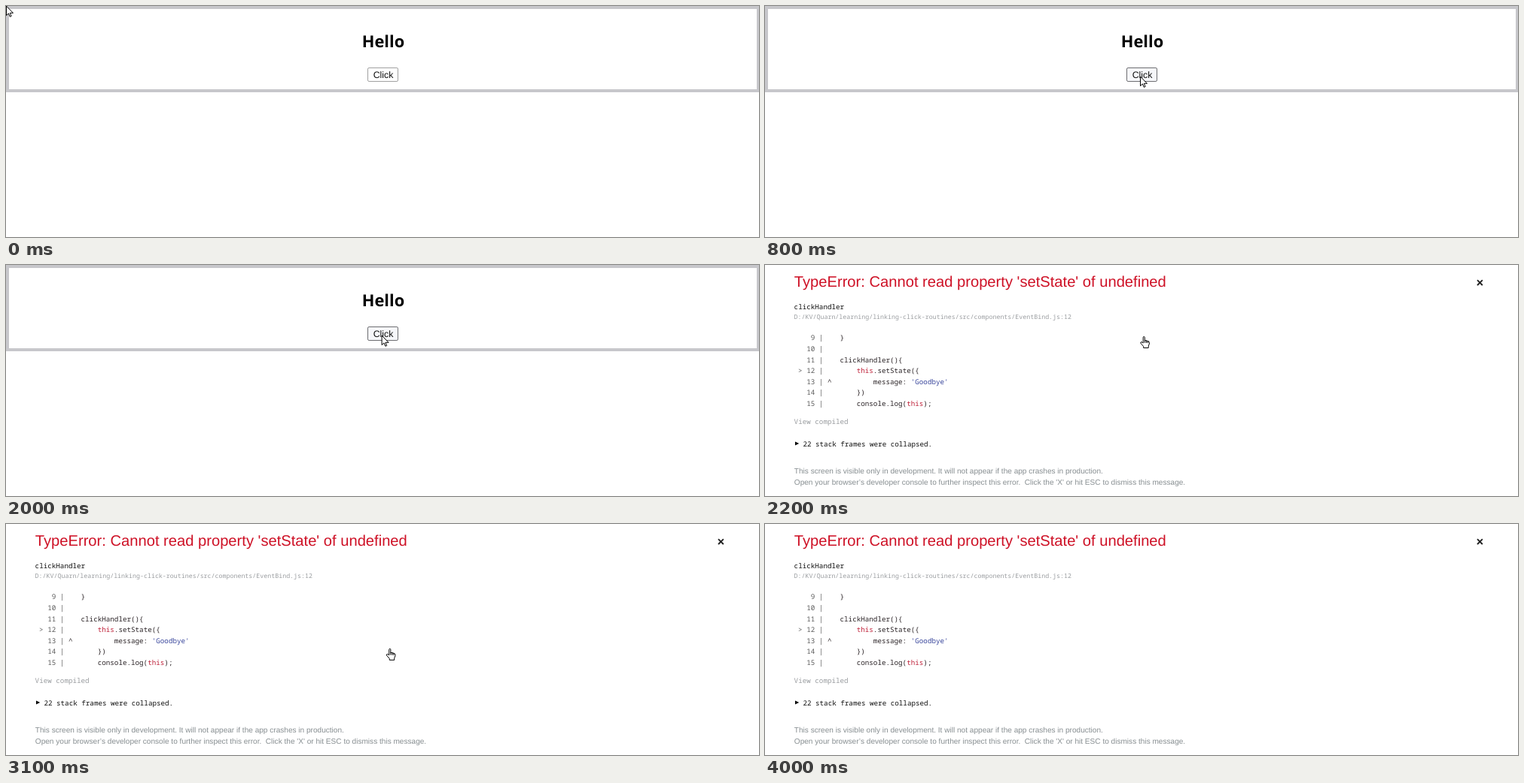
These frames come from a looping animation (1000 by 308 pixels, 6 s). An HTML page:

```html
<!DOCTYPE html>
<html lang="en">
<head>
<meta charset="utf-8">
<title>Click error</title>
<style>
  html, body { margin: 0; width: 100%; height: 100%; overflow: hidden; background: #fff; }
  svg { display: block; width: 100%; height: 100%; }
  text { white-space: pre; text-rendering: geometricPrecision; }
  .sans { font-family: "Liberation Sans", Arial, sans-serif; font-size: 10.08px; }
  .mono { font-family: "Noto Sans Mono", Consolas, monospace; font-size: 9.24px; fill: #111; }
  .heading { font: 700 21.8px "Open Sans", "Noto Sans", sans-serif; text-anchor: middle; }
  .label { font-size: 12.3px; text-anchor: middle; fill: #111; }
  .title { font-size: 20.16px; fill: #ce1126; }
  .path { font-size: 8.316px; }
  .dim { fill: #9a9da0; }
  .note { fill: #878e91; }
  .code { fill: #2b2427; }
  .gutter { fill: #5c5c5c; }
  .key { fill: #c0243c; }
  .str { fill: #3a479c; }
  .pointer { fill: #fff; stroke: #000; stroke-linejoin: round; stroke-linecap: round; }
</style>
</head>
<body>
<svg viewBox="0 0 1000 308" xmlns="http://www.w3.org/2000/svg">
  <g id="page">
    <path fill="#c7c7cb" fill-rule="evenodd" d="M0 0H1000V115H0Z M4 4V111H997V4Z"/>
    <text class="heading" x="501" y="55.3">Hello</text>
    <rect id="button" x="480.5" y="82.5" width="40" height="18" rx="1.6"/>
    <text class="sans label" x="501" y="95.8">Click</text>
    <path id="arrow" class="pointer" stroke-width="1"
      d="M.5 .5V12.6L3.4 9.9L5.3 14.3L7.1 13.5L5.3 9.3H9.1Z"/>
  </g>
  <g id="error">
    <text class="sans title" x="38.8" y="29.2">TypeError: Cannot read property 'setState' of undefined</text>
    <path d="M946 20.2L952.8 27M952.8 20.2L946 27" stroke="#222" stroke-width="1.9"/>
    <text class="mono" x="38.6" y="59.2">clickHandler</text>
    <text class="mono path dim" x="38.6" y="72.3">D:/KV/Quarn/learning/linking-click-routines/src/components/EventBind.js:12</text>
    <g id="code"></g>
    <text class="mono dim" x="38.6" y="212.4">View compiled</text>
    <path d="M40 235.6L45.2 238L40 240.4Z"/>
    <text class="mono" x="50.4" y="241.8">22 stack frames were collapsed.</text>
    <text class="sans note" x="38.8" y="278">This screen is visible only in development. It will not appear if the app crashes in production.</text>
    <text class="sans note" x="38.8" y="293">Open your browser’s developer console to further inspect this error.  Click the 'X' or hit ESC to dismiss this message.</text>
    <g id="hand" class="pointer">
      <path d="M4.2 8.6V1.7Q4.2 .5 5.2 .5Q6.3 .5 6.3 1.7V5.5L8.4 5.9L10.5 6.5L12 7.2Q12.6 8 12.4 10L11.2 13V15.5H4.7V13.6L.9 9.2Q.5 7.6 1.9 7.6Z"/>
      <path fill="none" d="M6.3 5.5V8.4M8.4 5.9V8.6M10.4 6.5V8.7"/>
    </g>
  </g>
</svg>
<script>
const LOOP = 6000, STEP = 100;
const $ = id => document.getElementById(id);
const [page, error, button, arrow, hand] = ['page', 'error', 'button', 'arrow', 'hand'].map($);

// Each line: gutter, then plain code with {k:keyword} or {s:string} spans.
const lines = [
  ['   9 | ', '   }'],
  ['  10 | ', ''],
  ['  11 | ', '   clickHandler(){'],
  ['> 12 | ', '       {k:this}.setState({'],
  ['  13 | ', '^          message: {s:\'Goodbye\'}'],
  ['  14 | ', '       })'],
  ['  15 | ', '       console.log({k:this});']
];

function span(parent, text, cls) {
  const el = document.createElementNS(parent.namespaceURI, 'tspan');
  el.textContent = text;
  el.setAttribute('class', cls);
  parent.append(el);
}

lines.forEach(([gutter, body], i) => {
  const row = document.createElementNS($('code').namespaceURI, 'text');
  row.setAttribute('class', 'mono');
  row.setAttribute('x', 44.1);
  row.setAttribute('y', 100.4 + i * 14.6);
  span(row, gutter, 'gutter');
  for (const part of body.split(/(\{[ks]:[^}]*\})/)) {
    const mark = part.match(/^\{([ks]):(.*)\}$/);
    if (mark) span(row, mark[2], mark[1] === 'k' ? 'key' : 'str');
    else if (part) span(row, part, 'code');
  }
  $('code').append(row);
});

// Progress of a move made in seven jumps, the first one at `start`.
const jumps = (t, start) =>
  Math.min(7, Math.max(0, Math.floor((t - start) / STEP) + 1)) / 7;
const smooth = u => u * u * (3 - 2 * u);
const place = (el, x, y) => el.setAttribute('transform', `translate(${x} ${y})`);

function buttonLook(t) {
  if (t < 800) return ['#fff', '#a0a0a0'];
  if (t >= 1000 && t < 1200) return ['#fcfcfd', '#a6a6a6'];
  return ['#f6f7fa', '#6c6c70'];
}

function draw(t) {
  const failed = t >= 2200;
  page.style.display = failed ? 'none' : '';
  error.style.display = failed ? '' : 'none';

  const [fill, stroke] = buttonLook(t);
  button.setAttribute('fill', fill);
  button.setAttribute('stroke', stroke);

  const come = smooth(jumps(t, 200));
  place(arrow, 498 * come + (t >= 1000 ? 0.6 : 0), 94 * come);

  const leave = jumps(t, 2800) ** 2;
  place(hand, 498 + 20 * leave, 95 + 217 * leave);
}

const begin = performance.now();
function tick() {
  draw((performance.now() - begin) % LOOP);
  requestAnimationFrame(tick);
}
draw(0);
requestAnimationFrame(tick);
</script>
</body>
</html>
```
